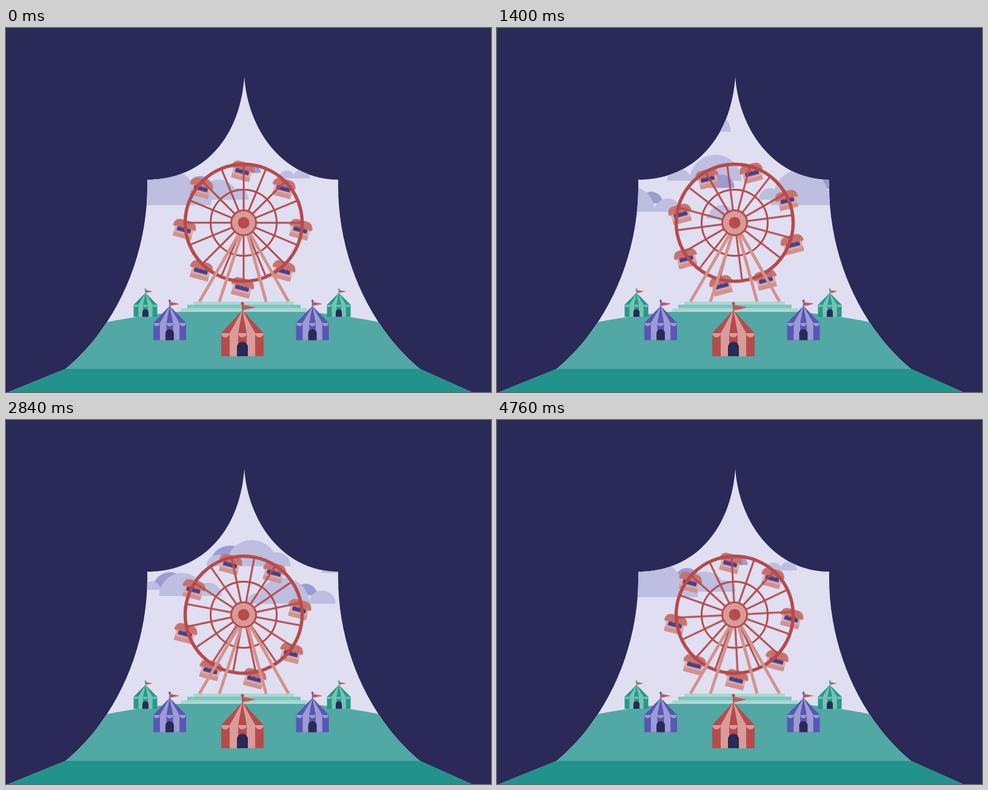
An HTML page without scripts for the animation above (4.8 s loop, 800 by 600 pixels).

```html
<!DOCTYPE html>
<html lang="en">
<head>
<meta charset="utf-8">
<title>Fairground</title>
<style>
  html, body { margin: 0; width: 100%; height: 100%; overflow: hidden; background: #2a2957; }
  svg { display: block; width: 100%; height: 100%; }

  .red { --main: #b64b4b; --pale: #d99c9a; }
  .violet { --main: #5757b3; --pale: #9d9bd4; }
  .green { --main: #25998b; --pale: #74c3b4; }
  .main { fill: var(--main); }
  .pale { fill: var(--pale); }
  .night { fill: #2a2957; }
  .light { fill: #bdbee0; }
  .dark { fill: #9c9bd2; }
  .iron { fill: none; stroke: #b64b4b; stroke-width: 3; }
  .legs { fill: none; stroke: #d4918e; stroke-width: 5; }

  .drift { animation: drift 4.8s linear infinite; }
  .turn { animation: turn 4.8s linear infinite; }
  .upright { animation: turn 4.8s linear infinite reverse; }
  .swing { animation: swing .48s ease-in-out infinite alternate; }
  .flag { fill: #c45c5a; d: path("M1 -85C8 -83 15 -82 22 -80C15 -79 8 -77 1 -76Z"); animation: wave .96s ease-in-out infinite; }

  @keyframes drift { to { transform: translateX(800px); } }
  @keyframes turn { from { transform: rotate(0deg); } to { transform: rotate(360deg); } }
  @keyframes swing { from { transform: rotate(15deg); } to { transform: rotate(-15deg); } }
  @keyframes wave {
    0%, 100% { d: path("M1 -85C8 -83 15 -82 22 -80C15 -79 8 -77 1 -76Z"); }
    40% { d: path("M1 -85C8 -82 15 -83 22 -81C15 -78 8 -76 1 -76Z"); }
    78% { d: path("M1 -85C8 -86 13 -79 22 -81C15 -73 9 -79 1 -76Z"); }
  }
</style>
</head>
<body>
<svg viewBox="0 0 800 600" preserveAspectRatio="none">
  <defs>
    <clipPath id="opening">
      <path d="M393 80C387 175 330 250 233 250C236 370 185 490 98 562L4 600H768L683 562C596 490 545 370 548 250C463 250 400 175 393 80Z"/>
    </clipPath>

    <!-- Each cloud is a row of domes: M left base, a radius ... -->
    <g id="clouds">
      <path class="dark" d="M299 265a21 21 0 0 1 42 0z"/>
      <path class="light" d="M198 283a19 19 0 0 1 38 0zM317 283a33 33 0 0 1 66 0zM362 283a19 19 0 0 1 38 0zM223 278a45 45 0 0 1 90 0zM218 268h100v15h20v9h-120z"/>

      <path class="dark" d="M2 289a19 19 0 0 1 38 0z"/>
      <path class="light" d="M-77 303a17 17 0 0 1 34 0zM-59 303a43 43 0 0 1 86 0zM26 303a22 22 0 0 1 44 0z"/>

      <path class="dark" d="M-138 241a34 34 0 0 1 68 0z"/>
      <path class="light" d="M-143 241a19 19 0 0 1 38 0zM-111 241a43 43 0 0 1 86 0zM-50 241a23 23 0 0 1 46 0z"/>

      <path class="dark" d="M-232 280a29 29 0 0 1 58 0z"/>
      <path class="light" d="M-247 280a14 14 0 0 1 28 0zM-221 290a38 38 0 0 1 76 0zM-162 290a22 22 0 0 1 44 0z"/>

      <path class="light" d="M450 248a13 13 0 0 1 26 0zM473 248a14 14 0 0 1 28 0z"/>
      <path class="dark" d="M392 239a14 14 0 0 1 28 0z"/>

      <path class="light" d="M47 252a20 20 0 0 1 40 0zM84 252a43 43 0 0 1 86 0z"/>
      <path class="dark" d="M114 263.500a22 22 0 0 1 44 0z"/>
      <path class="light" d="M112 314a9 9 0 0 1 18 0zM115 314a22 22 0 0 1 44 0zM150 314a14 14 0 0 1 28 0z"/>

      <path class="light" d="M211 174a15 15 0 0 1 30 0zM224 174a34 34 0 0 1 68 0z"/>
      <path class="dark" d="M78 147a16 16 0 0 1 32 0z"/>
      <path class="light" d="M31 180a44 44 0 0 1 75 -30v30zM84 171a34 34 0 0 1 68 0z"/>
      <path class="light" d="M-244 163a44 44 0 0 1 88 0z"/>
      <path class="dark" d="M-212 173.500a22 22 0 0 1 44 0z"/>
    </g>

    <!-- Cabin hangs from its pivot at 0,0 -->
    <g id="cabin">
      <path fill="#dfa9a8" d="M-15 6h31v20h-31z"/>
      <path fill="#d1918f" d="M-15 19h31v7h-31z"/>
      <path fill="#42418f" d="M-11 6h23v9.500h-23z"/>
      <path fill="#c9716e" d="M-19 8Q-18 -4 -8 -4H8Q18 -4 20 8q-3 3 -6 0q-3 3 -7 0q-3 3 -7 0q-3 3 -7 0q-3 3 -6 0q-3 3 -6 0z"/>
    </g>

    <g id="spokes" class="iron">
      <path id="spoke-pair" d="M0 -96V96M-96 0H96"/>
      <use href="#spoke-pair" transform="rotate(22.500)"/>
      <use href="#spoke-pair" transform="rotate(45)"/>
      <use href="#spoke-pair" transform="rotate(67.500)"/>
    </g>

    <!-- Tent stands on 0,0 -->
    <g id="tent">
      <path class="main" d="M-1 -87h2v13h-2z"/>
      <circle class="main" cy="-87" r="2.500"/>
      <path class="main" d="M0 -76L35 -38V0H-35V-38Z"/>
      <path class="pale" d="M0 -76L-21 -38h14zL7 -38h14zM-21 -38h14v38h-14zM7 -38h14v38h-14z"/>
      <path class="pale" d="M-35 -38a7 7 0 0 0 14 0a7 7 0 0 0 14 0a7 7 0 0 0 14 0a7 7 0 0 0 14 0a7 7 0 0 0 14 0z"/>
      <path class="night" d="M-9 0V-15a9 9 0 0 1 18 0V0z"/>
    </g>
  </defs>

  <path class="night" d="M0 0h800v600H0z"/>
  <g clip-path="url(#opening)">
    <path fill="#dfdff1" d="M0 0h800v600H0z"/>
    <g class="drift">
      <use href="#clouds"/>
      <use href="#clouds" x="-800"/>
    </g>
    <path fill="#51a8a5" d="M160 486Q390 440 622 486L700 562H80z"/>
    <path fill="#21928c" d="M0 562h800v38H0z"/>
  </g>

  <path fill="#a8d8d4" d="M309 451h166v5h-166zM289 462h208v6h-208z"/>
  <path fill="#7fc5be" d="M299 456h187v6h-187z"/>

  <g transform="translate(392 321)">
    <g class="turn">
      <g transform="translate(0 -96)"><g class="upright"><use class="swing" href="#cabin"/></g></g>
      <g transform="translate(68 -68)"><g class="upright"><use class="swing" href="#cabin"/></g></g>
      <g transform="translate(96 0)"><g class="upright"><use class="swing" href="#cabin"/></g></g>
      <g transform="translate(68 68)"><g class="upright"><use class="swing" href="#cabin"/></g></g>
      <g transform="translate(0 96)"><g class="upright"><use class="swing" href="#cabin"/></g></g>
      <g transform="translate(-68 68)"><g class="upright"><use class="swing" href="#cabin"/></g></g>
      <g transform="translate(-96 0)"><g class="upright"><use class="swing" href="#cabin"/></g></g>
      <g transform="translate(-68 -68)"><g class="upright"><use class="swing" href="#cabin"/></g></g>
      <use href="#spokes"/>
    </g>
    <circle class="iron" r="54.500"/>
    <circle class="iron" r="96.500" style="stroke-width:5.500"/>
    <path class="legs" d="M-7 17L-73 130M-3 17L-40 130M6 17L37 130M10 17L74 130"/>
    <circle r="20.500" fill="#d99a98" stroke="#b64b4b" stroke-width="3"/>
    <circle r="9.500" fill="#b64b4b"/>
  </g>

  <g class="green" transform="translate(230 476) scale(.557 .52)"><path class="flag"/><use href="#tent"/></g>
  <g class="green" transform="translate(549 476) scale(.557 .52)"><path class="flag"/><use href="#tent"/></g>
  <g class="violet" transform="translate(270 514.500) scale(.771 .745)"><path class="flag"/><use href="#tent"/></g>
  <g class="violet" transform="translate(505.500 514.500) scale(.771 .745)"><path class="flag"/><use href="#tent"/></g>
  <g class="red" transform="translate(390 541)"><path class="flag"/><use href="#tent"/></g>
</svg>
</body>
</html>
```
